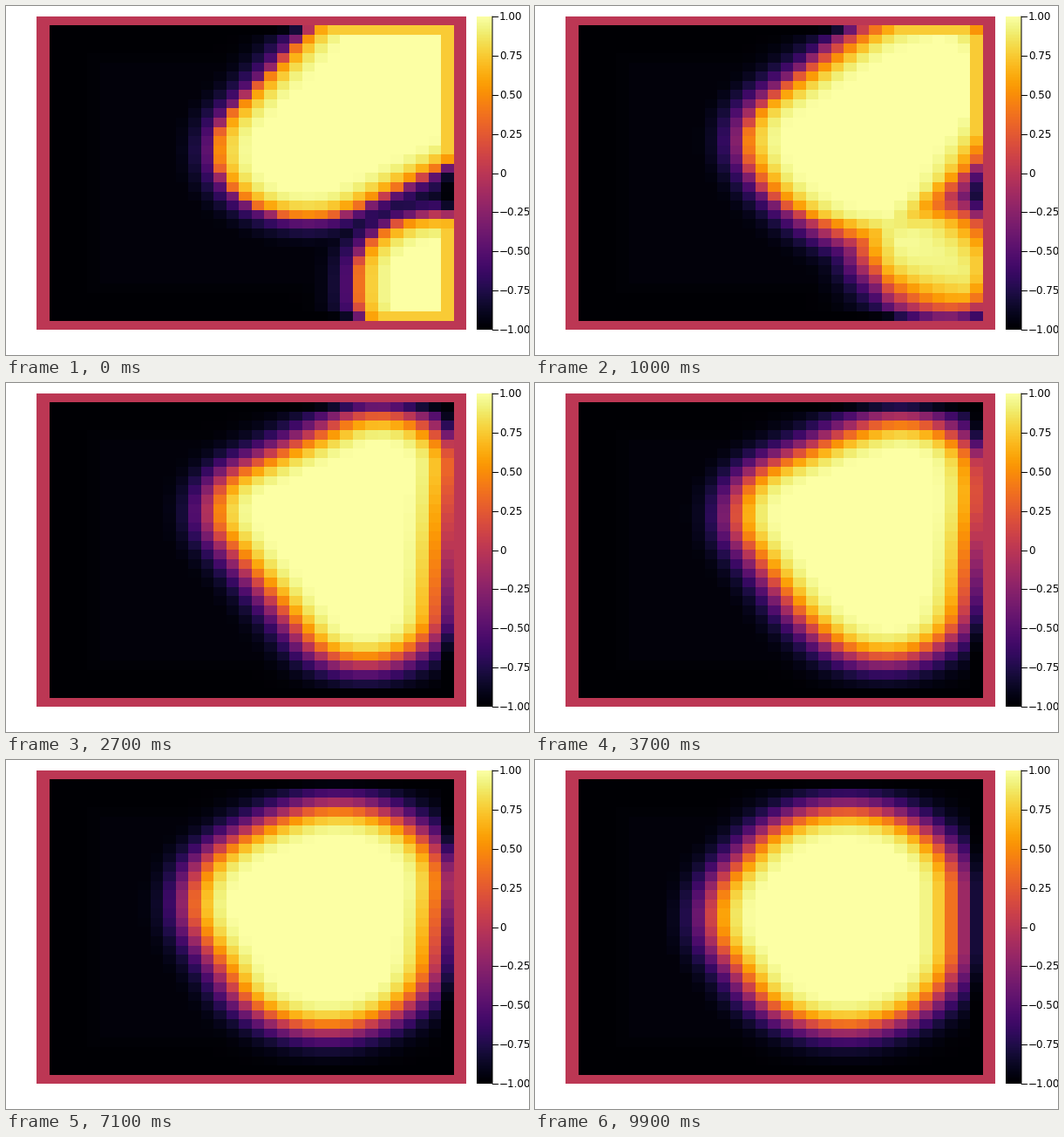
Animation, 600 px wide and 400 px high, one loop 10000 ms. Source, as a matplotlib script:

```python
import numpy as np
import matplotlib.pyplot as plt
from matplotlib.animation import FuncAnimation

N = 34                                   # cells per side, outer ring stays at zero
X0, X1, Y0, Y1 = 35.3, 528.3, 11.6, 371.4
SLOPE = 0.53                             # steepness of the interface per cell

idx = np.arange(1, N - 1)
cols, rows = np.meshgrid(idx, idx)
cells = np.dstack([cols, rows]) + 0.5

# distance to the nearest wall, and the faint glow away from it
wall = np.minimum.reduce([cols, rows, N - 1 - cols, N - 1 - rows])
floor = -1 + 0.035 * np.clip((wall - 3) / 2, 0, 1)


def rounded(r, *corners):
    """Signed distance to a convex polygon (clockwise) grown by r."""
    p = np.array(corners, float)
    e = np.roll(p, -1, 0) - p
    rel = cells[:, :, None] - p
    s = np.clip((rel * e).sum(-1) / (e * e).sum(-1), 0, 1)
    d = np.linalg.norm(rel - s[..., None] * e, axis=-1).min(-1)
    cross = e[:, 0] * rel[..., 1] - e[:, 1] * rel[..., 0]
    return r + np.where((cross > 0).all(-1), d, -d)


# two separate drops merge into a wedge that slowly rounds off
body = rounded(7.5, (21.5, 14.5), (30, 2.5), (33, 7))
lobe = rounded(6.5, (31.7, 28), (31.7, 30))
drops = np.maximum(body, lobe)
wedge = rounded(6, (19.6, 12.8), (27.1, 8), (26, 23.5))
pear = rounded(8.3, (20.6, 13.8), (24.5, 11.8), (23.4, 20.1))
egg = rounded(9, (20.5, 15), (23, 12.8), (22.7, 19.3))
disc = rounded(9, (20.3, 15.8), (22.2, 13), (22.2, 19.2))

times = [0, 27, 54, 87, 99]
keys = [SLOPE * d for d in (drops, wedge, pear, egg, disc)]
keys[0] += 0.25 * np.tanh(4 * drops)     # the first edge is still sharp

# the picture refreshes less often as the motion slows
steps = np.array([*range(35), *range(36, 39), *range(40, 57, 2),
                  *range(59, 72, 3), *range(73, 77, 3), *range(79, 100, 2)])


def field(i):
    t = steps[steps <= i].max()
    k = min(np.searchsorted(times, t, side="right"), len(keys) - 1) - 1
    p = (t - times[k]) / (times[k + 1] - times[k])
    if k == 0:
        p **= 0.6                        # fast merge, then slow drift
    u = (1 - p) * keys[k] + p * keys[k + 1]
    v = np.tanh(np.where((wall == 1) & (u < 0), 1.6 * u, u))
    v = np.where(v > 0, 1.05 * v, v)
    v = np.minimum(v, np.where(wall == 1, 0.75, 1))
    grid = np.zeros((N, N))
    grid[1:-1, 1:-1] = np.maximum(v, floor)
    return grid


fig = plt.figure(figsize=(6, 4), dpi=100, facecolor="white")
ax = fig.add_axes([0, 0, 1, 1])
style = dict(cmap="inferno", vmin=-1, vmax=1)
heat = ax.pcolormesh(np.round(np.linspace(X0, X1, N + 1)),
                     np.round(np.linspace(Y0, Y1, N + 1)), field(0), **style)
top, bottom = 12, 371
ax.imshow(np.linspace(1, -1, 256)[:, None], extent=(540, 558, bottom, top),
          interpolation="nearest", aspect="auto", **style)

line = dict(color="black", lw=0.72)
ax.plot([558, 558], [top, bottom], snap=False, **line)
for k in range(9):
    value = 1 - k / 4
    y = top + (bottom - top) * k / 8
    label = f"{value:.2f}".replace("-", "\u2212") if value else "0"
    ax.plot([558, 564], [y, y], **line)
    ax.text(566, y + 4, label, family="DejaVu Sans", size=8.64,
            va="baseline", ha="left")

ax.set_xlim(0, 600)
ax.set_ylim(400, 0)
ax.axis("off")


def update(i):
    heat.set_array(field(i))
    return [heat]


anim = FuncAnimation(fig, update, frames=100, interval=100, repeat=True)
plt.show()
```
